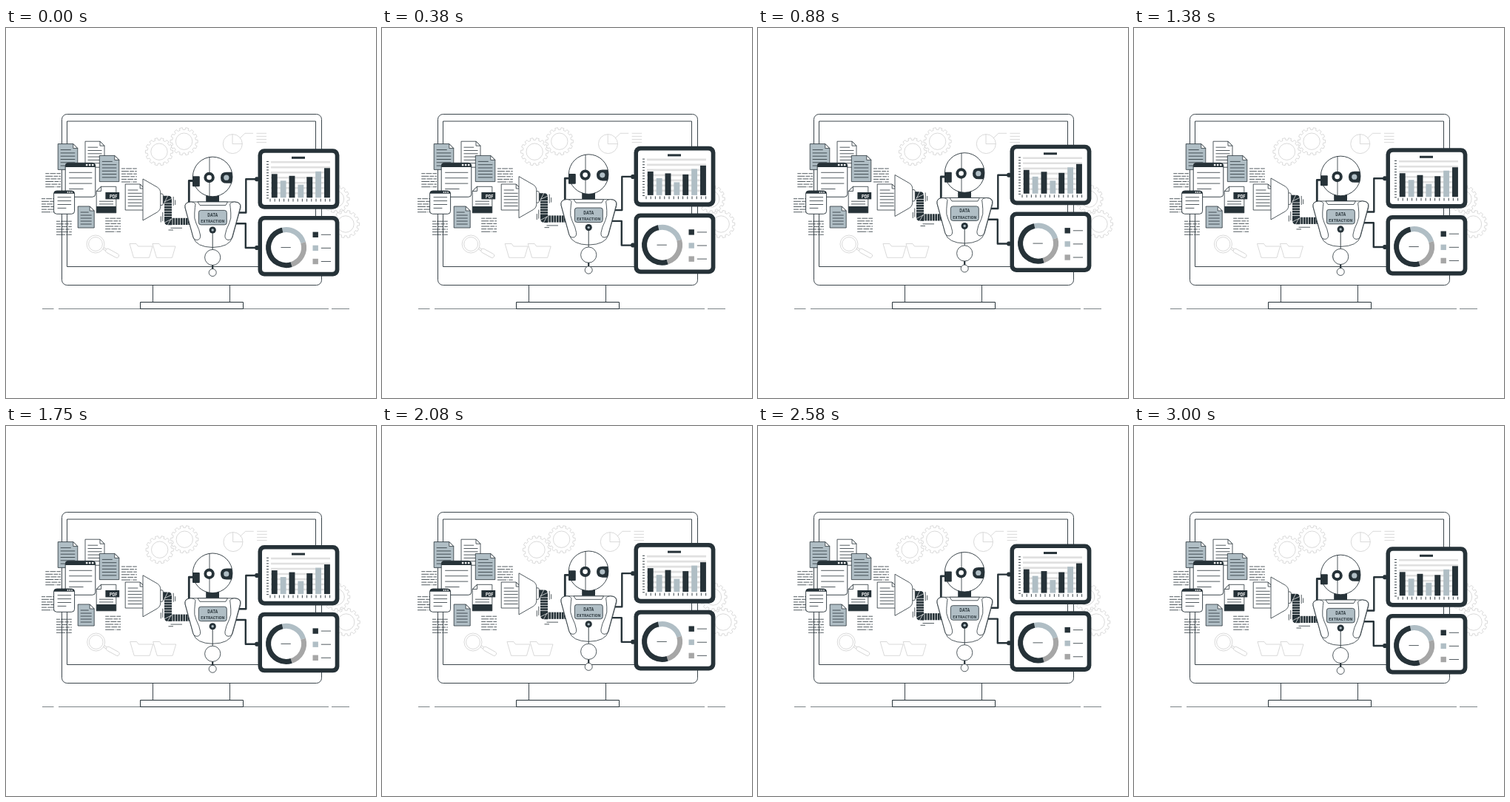
An HTML page with a canvas for the animation above (3.04 s loop, 500 by 500 pixels).

```html
<!DOCTYPE html>
<html lang="en">
<head>
<meta charset="utf-8">
<title>Data extraction</title>
<style>
html, body { margin: 0; width: 100%; height: 100%; overflow: hidden; background: #fff; }
canvas { display: block; width: 500px; height: 500px; }
</style>
</head>
<body>
<canvas id="stage"></canvas>
<script>
const LOOP = 3040, CYCLE = 1500, UNIT = 2 / 3;
const DARK = '#263238', BLUE = '#b0bec5', GREY = '#a6a6a6', PALE = '#d0d0d0', WHITE = '#fff';
const FACE = "'Noto Sans ExtraCondensed', 'Noto Sans Condensed', 'Roboto Condensed', 'Open Sans Condensed', " +
  "'Liberation Sans Narrow', 'Open Sans', 'Noto Sans', sans-serif";
const canvas = document.getElementById('stage');
const ctx = canvas.getContext('2d');
const dpr = window.devicePixelRatio || 1;
canvas.width = canvas.height = 500 * dpr;

function paint(fill, stroke, width = 0.8) {
  if (fill) { ctx.fillStyle = fill; ctx.fill(); }
  if (stroke) { ctx.strokeStyle = stroke; ctx.lineWidth = width; ctx.stroke(); }
}
function box(x1, y1, x2, y2, r, fill, stroke, width) {
  ctx.beginPath();
  ctx.roundRect(x1, y1, x2 - x1, y2 - y1, r);
  paint(fill, stroke, width);
}
function disc(x, y, r, fill, stroke, width) {
  ctx.beginPath();
  ctx.arc(x, y, r, 0, Math.PI * 2);
  paint(fill, stroke, width);
}
function line(points, color = DARK, width = 0.8) {
  ctx.beginPath();
  for (let i = 0; i < points.length; i += 2) ctx.lineTo(points[i], points[i + 1]);
  paint(null, color, width);
}
function shape(d, fill, stroke, width = 0.8) {
  const p = new Path2D(d);
  if (fill) { ctx.fillStyle = fill; ctx.fill(p); }
  if (stroke) { ctx.strokeStyle = stroke; ctx.lineWidth = width; ctx.stroke(p); }
}
function rows(x1, x2, y, n, gap, color, width) {
  for (let i = 0; i < n; i++) line([x1, y + i * gap, x2, y + i * gap], color, width);
}
// Picks the type size that makes the text fit the given width.
function label(text, x, y, width, color) {
  const font = size => `extra-condensed 500 ${size}px ${FACE}`;
  ctx.font = font(10);
  ctx.font = font(Math.min(10 * width / ctx.measureText(text).width, 8.6));
  ctx.fillStyle = color;
  ctx.textAlign = 'center';
  ctx.textBaseline = 'alphabetic';
  ctx.fillText(text, x, y);
}

function monitor() {
  line([49, 379.5, 64.5, 379.5], DARK, 0.6);
  line([71, 379.5, 436, 379.5], DARK, 0.6);
  line([440, 379.5, 464, 379.5], DARK, 0.6);
  box(198.5, 340, 302.5, 371, 0, WHITE, DARK, 0.9);
  box(181.5, 370.5, 320.5, 379.5, 0, WHITE, DARK, 1);
  box(75.5, 116.5, 426.5, 347.5, 7, WHITE, DARK, 0.9);
  box(82.5, 126, 418.5, 322.5, 0, WHITE, DARK, 0.9);
}

function gear(x, y) {
  const teeth = 14, step = Math.PI * 2 / teeth;
  ctx.beginPath();
  for (let i = 0; i < teeth; i++) {
    const a = i * step;
    ctx.arc(x, y, 18.6, a - step * 0.23, a + step * 0.23);
    ctx.arc(x, y, 15.8, a + step * 0.3, a + step * 0.7);
  }
  ctx.closePath();
  paint(WHITE, PALE);
  disc(x, y, 11.2, WHITE, PALE);
}

function icons() {
  gear(207, 167.2);
  gear(240.6, 153.2);
  gear(445.5, 231);
  gear(459, 265);
  disc(306.3, 156.6, 13, WHITE, PALE);
  line([306, 143.6, 306, 156.6, 319.3, 156.6], PALE);
  line([316, 149, 323, 142.3, 334, 142.3], PALE);
  rows(338.5, 352, 142.3, 4, 4.1, PALE);

  ctx.save();
  ctx.translate(121, 292);
  ctx.rotate(0.5);
  box(12, -1.2, 17, 1.2, 0, WHITE, PALE);
  box(16, -2.8, 35.5, 2.8, 2.6, WHITE, PALE);
  ctx.restore();
  disc(121, 292, 12, WHITE, PALE);
  disc(121, 292, 9.4, WHITE, PALE);

  for (const x of [167, 198]) {
    ctx.save();
    ctx.translate(x, 0);
    shape('M0 291.5H9L11.5 295H31L26.5 310.3H5.5Z', WHITE, PALE);
    ctx.restore();
  }
}

function sheet(x, y, w, h, fill, gap = 4.3) {
  const f = 6, r = x + w;
  shape(`M${x} ${y}H${r - f}L${r} ${y + f}V${y + h}H${x}Z`, fill, DARK);
  shape(`M${r - f} ${y}V${y + f}H${r}Z`, WHITE, DARK);
  line([x + 3.5, y + 8, x + w * 0.66, y + 8]);
  rows(x + 3.5, r - 3.5, y + 8 + gap, Math.floor((h - 11) / gap), gap);
}
function page(x, y, w, h, bar, gap) {
  box(x, y, x + w, y + h, 4, WHITE, DARK, 0.9);
  box(x, y, x + w, y + bar, [4, 4, 0, 0], DARK);
  for (let i = 0; i < 3; i++) disc(x + w - 3.6 - i * bar * 0.72, y + bar / 2, bar * 0.25, WHITE);
  rows(x + 5, x + w - 4.5, y + bar + gap, 3, gap);
  line([x + 5, y + bar + gap * 4, x + w * 0.6, y + bar + gap * 4]);
}
function paragraph(x, y) {
  for (let i = 0; i < 6; i++) {
    const a = x + 5 + (i * 5 % 9), b = x + 14 + (i * 3 % 5), ly = y + i * 3.6;
    line([x, ly, a, ly]);
    line([a + 1.2, ly, b, ly]);
    line([b + 1.2, ly, x + 20.8, ly]);
  }
}

function papers() {
  paragraph(156, 190);
  paragraph(53.3, 196.7);
  paragraph(48, 230.7);
  paragraph(68, 261.2);
  paragraph(134.2, 257.2);
  sheet(70.2, 156.6, 26.6, 34.8, BLUE);
  sheet(107, 153.2, 26, 35, WHITE);
  sheet(126.3, 172.4, 26.5, 35.2, BLUE);
  sheet(97.2, 241, 22, 29, BLUE, 4);
  sheet(161.2, 211, 26, 35, WHITE);
  page(80.2, 182.3, 40.6, 46, 5.6, 7.4);
  page(64.6, 220, 28, 31.3, 3.8, 4.9);

  shape('M122.2 220.5L128.5 214.3H148.8V249.8H122.2Z', WHITE, DARK);
  shape('M122.2 220.5H128.5V214.3Z', WHITE, DARK);
  rows(126, 145, 234.2, 2, 3.7);
  box(122.2, 241, 148.8, 249.8, 0, DARK);
  box(134.4, 222, 153.2, 231.4, 0, DARK);
  label('PDF', 145.2, 229.7, 10.5, WHITE);
}

function hose() {
  line([212, 232, 215, 232], DARK, 10);
  shape('M211.5 226.7H219Q224 226.7 224 232V237H214V232Z', DARK);
  box(214, 233, 224, 258, 0, DARK);
  shape('M214 256H224V266.3H219Q214 266.3 214 261Z', DARK);
  box(222, 256.8, 248, 266, 0, DARK);
  for (let y = 237; y < 256; y += 3.5) line([213.4, y, 224.6, y], WHITE, 0.8);
  for (let x = 225; x < 247; x += 3.5) line([x, 256, x, 266.8], WHITE, 0.8);
  line([214, 236, 219, 226], WHITE, 0.7);
  line([214, 235, 225, 230], WHITE, 0.7);
  line([224, 258, 214, 263], WHITE, 0.7);
  line([223, 258, 218, 267], WHITE, 0.7);
  line([209.3, 254.5, 209.3, 262.5]);
  line([211.8, 249, 211.8, 261]);
  line([226.2, 228, 226.2, 240]);
  line([228.7, 232.5, 228.7, 239]);
  line([222.5, 270.3, 238, 270.3]);
  line([219.5, 273, 226, 273]);

  shape('M207 224H210.5Q212.3 224 212.3 226V237.5Q212.3 239.5 210.5 239.5H207Z', WHITE, DARK);
  shape('M185 204L204.5 215.2Q208.8 218 208.8 223V241Q208.8 246 204.5 248.8L185 260Z', WHITE, DARK);
}

function robot() {
  line([254, 206.5, 247.3, 206.5, 247.3, 264], DARK, 2.8);
  line([306, 249.5, 324.3, 249.5, 324.3, 204.3, 339, 204.3], DARK, 2.4);
  line([306, 264.3, 323.8, 264.3, 323.8, 297, 339, 297], DARK, 2.4);
  box(336.3, 201.3, 342, 207.3, 2, DARK);
  box(336.3, 294, 342, 300, 2, DARK);

  // Head
  box(270.2, 224, 288, 238, 0, DARK);
  disc(279.2, 201, 26.8, WHITE, DARK, 0.9);
  line([275, 174.5, 275, 227.3]);
  box(252, 200.3, 261.8, 214.2, 1, DARK);
  shape('M305 194.8H298Q290 194.8 290 202.2Q290 209.8 298 209.8H305Q307 202 305 194.8Z', DARK);
  disc(297.8, 202.2, 3.6, BLUE);
  disc(274.6, 202, 7.2, DARK);
  disc(274.6, 202, 3.3, WHITE);

  // Body
  shape('M250 235H309Q318 235 317 243L306 283Q302 296 279.2 296.5Q257 296 253 283L242 243Q241 235 250 235Z', WHITE, DARK);
  shape('M259 235H299.5L297 239.5H262Z', WHITE, DARK);
  shape('M250 235Q240.5 235.5 242.2 243L252.8 282Q254.2 286.8 258.6 286.4Q263.2 285.7 262.6 280Q261.6 273 257 264Q253.8 257 254.8 250Q255.4 241 256 238Q255 235 250 235Z', WHITE, DARK);
  shape('M308.6 235Q318.2 235.5 316.4 243L305.8 282Q304.4 286.8 300 286.4Q295.4 285.7 296 280Q297 273 301.6 264Q304.8 257 303.8 250Q303.2 241 302.6 238Q303.6 235 308.6 235Z', WHITE, DARK);
  box(260.4, 246.4, 298.3, 265.9, 3, BLUE, DARK);
  label('DATA', 279.3, 255, 14, DARK);
  label('EXTRACTION', 279.3, 263.4, 32, DARK);

  line([279.2, 276, 279.2, 300], DARK, 0.9);
  disc(279.2, 273, 4.6, DARK);
  disc(279.2, 273, 1.7, BLUE);
  line([279.2, 319, 279.2, 326], DARK, 2.2);
  disc(279.2, 310, 10.6, WHITE, DARK);
  disc(279.2, 330.5, 5, WHITE, DARK);
}

function panels() {
  for (const y of [163.2, 254]) {
    box(340.5, y, 450.4, y + 81.6, 8.5, DARK);
    box(346, y + 5.6, 444.7, y + 75.8, 4, WHITE);
  }

  // Bar chart
  box(386, 173.8, 404, 176.8, 0, DARK);
  rows(358, 438, 181.3, 7, 7, '#e0e0e0', 2.6);
  rows(352, 355, 180.5, 14, 3.8, DARK, 0.9);
  [32, 23, 29.5, 17.5, 28, 35.5, 40].forEach((h, i) => {
    const x = 358.8 + i * 11.87;
    box(x, 229.3 - h, x + 7.9, 229.3, 0, i % 2 ? BLUE : DARK);
  });
  for (let i = 0; i < 14; i++) {
    const x = 357 + i * 6.2;
    line([x, 230.8, x, 234.6], DARK, 0.9);
  }

  // Ring chart
  [[-102, -16, BLUE], [-16, 73, GREY], [73, 258, DARK]].forEach(([a, b, color]) => {
    ctx.beginPath();
    ctx.arc(378.6, 296.6, 24, a * Math.PI / 180, b * Math.PI / 180);
    paint(null, color, 7);
  });
  line([371.5, 296.6, 384.8, 296.6], DARK, 0.8);
  [DARK, BLUE, GREY].forEach((color, i) => {
    const y = 279.3 + i * 18.1;
    box(414.5, y - 3.7, 421.9, y + 3.7, 0, color);
    line([425.8, y, 439, y], DARK, 0.8);
  });
}

const SHAKE = [0, -1, 2, -4, 4, -4, 4, -4, 2, -1, 0];
function shake(p) {
  const i = Math.min(9, Math.floor(p * 10));
  return UNIT * (SHAKE[i] + (SHAKE[i + 1] - SHAKE[i]) * (p * 10 - i));
}
function lift(p) {
  return -10 * UNIT * (1 - Math.abs(2 * p - 1));
}
function moved(x, y, ...parts) {
  ctx.save();
  ctx.translate(x, y);
  parts.forEach(part => part());
  ctx.restore();
}

function draw(t) {
  const p = t % CYCLE / CYCLE;
  ctx.setTransform(dpr, 0, 0, dpr, 0, 0);
  ctx.fillStyle = WHITE;
  ctx.fillRect(0, 0, 500, 500);
  ctx.lineJoin = 'round';
  monitor();
  moved(shake(p), 0, icons);
  papers();
  moved(0, lift(p), hose, robot, panels);
}

const start = performance.now();
function tick() {
  draw((performance.now() - start) % LOOP);
  requestAnimationFrame(tick);
}
tick();
</script>
</body>
</html>
```
